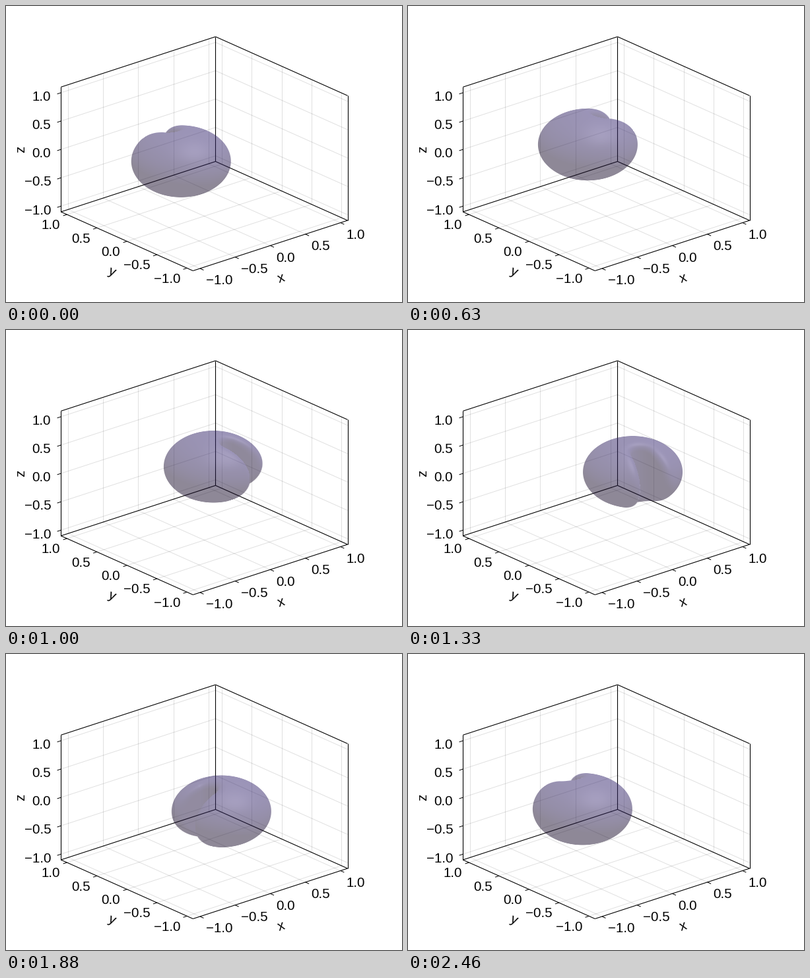
Write a matplotlib script that moves like this. It is 600 by 450 pixels and loops after 2500 ms.

```python
import numpy as np
import matplotlib.pyplot as plt
from matplotlib.animation import FuncAnimation

W, H, DPI = 600, 450, 100
FRAMES, LOOP_MS = 60, 2500
PX = 72 / DPI                      # points per pixel

# Orthographic camera
AZ, EL = 1.275 * np.pi, np.pi / 8
SA, CA, SE, CE = np.sin(AZ), np.cos(AZ), np.sin(EL), np.cos(EL)
UNIT, Z_ASPECT = 140.0, 2 / 3
CENTER = (300.4, 224.6)
LIM = 1.1
TICKS = np.linspace(-1, 1, 5)

# Body: a ball with a vertical trench, circling the origin
ORBIT, RADIUS = 0.33, 0.535
BALL_PX = RADIUS * UNIT
TRENCH, FLARE, FLOOR, ROUNDING = 0.22, 0.15, 0.15, 0.22
LEAD = 0.03                        # radians gained while settling
LIGHT = np.array([0.33, 0.90, 0.25])
HALF = np.array([0.21, 0.57, 0.79])
WRAP = 0.35
DARK = np.array([28, 16, 46]) / 255
LIT = np.array([56, 42, 114]) / 255
SHINE = 0.10
ALPHA = 0.5
WIN_W, WIN_H = 160, 120


def project(x, y, z):
    right = -x * SA + y * CA
    back = -x * CA - y * SA
    up = back * SE + z * Z_ASPECT * CE
    return CENTER[0] + UNIT * right, CENTER[1] - UNIT * up


fig = plt.figure(figsize=(W / DPI, H / DPI), dpi=DPI, facecolor="white")
ax = fig.add_axes([0, 0, 1, 1])
ax.axis("off")


def segment(p, q, color="black", width=1.1, order=2):
    (x0, y0), (x1, y1) = project(*p), project(*q)
    ax.plot([x0, x1], [y0, y1], color=color, lw=width * PX, zorder=order,
            solid_capstyle="butt")


def label(x, y, text, **kw):
    ax.text(x, y, text, family="Liberation Sans", size=20.5 * PX,
            va="baseline", zorder=3, **kw)


def tick(point, step, dx, dy, ha, value):
    """Short outward stroke plus its number."""
    x, y = project(*point)
    ex, ey = project(*np.add(point, step))
    k = 6 / np.hypot(ex - x, ey - y)
    ax.plot([x, x + (ex - x) * k], [y, y + (ey - y) * k], color="black",
            lw=PX, zorder=2, solid_capstyle="butt")
    label(x + dx, y + dy + 7.3, f"{value:.1f}".replace("-", "\u2212"), ha=ha)


def draw_box():
    lo, hi = -LIM, LIM
    grid = dict(color=(0, 0, 0, 0.12), width=1, order=1)
    for t in TICKS:
        segment((t, lo, lo), (t, hi, lo), **grid)
        segment((lo, t, lo), (hi, t, lo), **grid)
        segment((t, hi, lo), (t, hi, hi), **grid)
        segment((hi, t, lo), (hi, t, hi), **grid)
        segment((lo, hi, t), (hi, hi, t), **grid)
        segment((hi, lo, t), (hi, hi, t), **grid)
        tick((t, lo, lo), (0, -1, 0), 9, 17, "left", t)
        tick((lo, t, lo), (-1, 0, 0), -10, 15, "right", t)
        tick((lo, hi, t), (-1, 0, 0), -15, 5, "right", t)

    for x, y in ((lo, hi), (hi, hi), (hi, lo)):
        segment((x, y, lo), (x, y, hi))
    for z in (lo, hi):
        segment((lo, hi, z), (hi, hi, z))
        segment((hi, hi, z), (hi, lo, z))
    segment((lo, lo, lo), (hi, lo, lo))
    segment((lo, lo, lo), (lo, hi, lo))

    turned = dict(ha="center", rotation_mode="anchor")
    label(418.7, 419.1, "x", rotation=18, **turned)
    label(158.7, 409.9, "y", rotation=-24, **turned)
    label(28.4, 217.5, "z", rotation=90, **turned)


def body_distance(a, b, z, turn, half):
    """Signed distance in ball radii; a points right, b points back."""
    ball = np.sqrt(a * a + b * b + z * z) - 1
    out = a * np.sin(turn) - b * np.cos(turn) - (FLOOR + half)
    side = a * np.cos(turn) + b * np.sin(turn)
    cut = half + FLARE * np.maximum(out, 0) - np.hypot(side, np.minimum(out, 0))
    blend = np.maximum(ROUNDING - np.abs(ball - cut), 0)
    return np.maximum(ball, cut) + blend * blend / (4 * ROUNDING)


def render_body(px, py, turn, half):
    """Ray-march the ball for pixel offsets px, py; returns RGBA."""
    a, up = px / BALL_PX, py / BALL_PX
    b0, z0 = up * SE, up * CE / Z_ASPECT
    db, dz = CE, -SE / Z_ASPECT
    dd = db * db + dz * dz
    mid = b0 * db + z0 * dz
    disc = mid * mid - dd * (a * a + b0 * b0 + z0 * z0 - 1)
    s = (-mid - np.sqrt(np.maximum(disc, 0))) / dd

    near = np.full(s.shape, 9.0)
    best = s.copy()
    for _ in range(45):
        dist = body_distance(a, b0 + s * db, z0 + s * dz, turn, half)
        closer = dist < near
        near = np.where(closer, dist, near)
        best = np.where(closer, s, best)
        s = s + dist / np.sqrt(dd)

    b, z = b0 + best * db, z0 + best * dz
    e = 0.004
    base = body_distance(a, b, z, turn, half)
    na = body_distance(a + e, b, z, turn, half) - base
    nb = body_distance(a, b + e, z, turn, half) - base
    nz = (body_distance(a, b, z + e, turn, half) - base) / Z_ASPECT
    normal = np.stack([na, nb * SE + nz * CE, nz * SE - nb * CE], axis=-1)
    normal /= np.linalg.norm(normal, axis=-1, keepdims=True) + 1e-9

    diffuse = np.clip((normal @ LIGHT + WRAP) / (1 + WRAP), 0, 1)[..., None]
    gloss = np.clip(normal @ HALF, 0, 1)[..., None] ** 24
    rgb = DARK + (LIT - DARK) * diffuse + SHINE * gloss
    cover = np.clip(1.1 - near * BALL_PX, 0, 1)
    return np.concatenate([np.clip(rgb, 0, 1), ALPHA * cover[..., None]], axis=-1)


draw_box()
body = ax.imshow(np.zeros((WIN_H, WIN_W, 4)), aspect="auto",
                 interpolation="nearest", zorder=4)
ax.set_xlim(0, W)
ax.set_ylim(H, 0)


def update(i):
    # The orbit and the trench width settle over the first few steps
    settle = 1 - np.exp(-i / 3)
    angle = np.pi - 2 * np.pi * i / (FRAMES - 1) - LEAD * settle
    half = TRENCH * (0.65 + 0.35 * settle)
    cx, cy = project(ORBIT * np.cos(angle), ORBIT * np.sin(angle), 0)
    left, top = round(cx) - WIN_W // 2, round(cy) - WIN_H // 2
    px, py = np.meshgrid(left + np.arange(WIN_W) + 0.5 - cx,
                         cy - top - np.arange(WIN_H) - 0.5)
    # The trench faces along the path
    body.set_data(render_body(px, py, angle - np.pi / 2 - AZ, half))
    body.set_extent((left, left + WIN_W, top + WIN_H, top))
    ax.set_xlim(0, W)
    ax.set_ylim(H, 0)
    return [body]


anim = FuncAnimation(fig, update, frames=FRAMES, interval=LOOP_MS / FRAMES,
                     repeat=True, repeat_delay=0)
plt.show()
```
